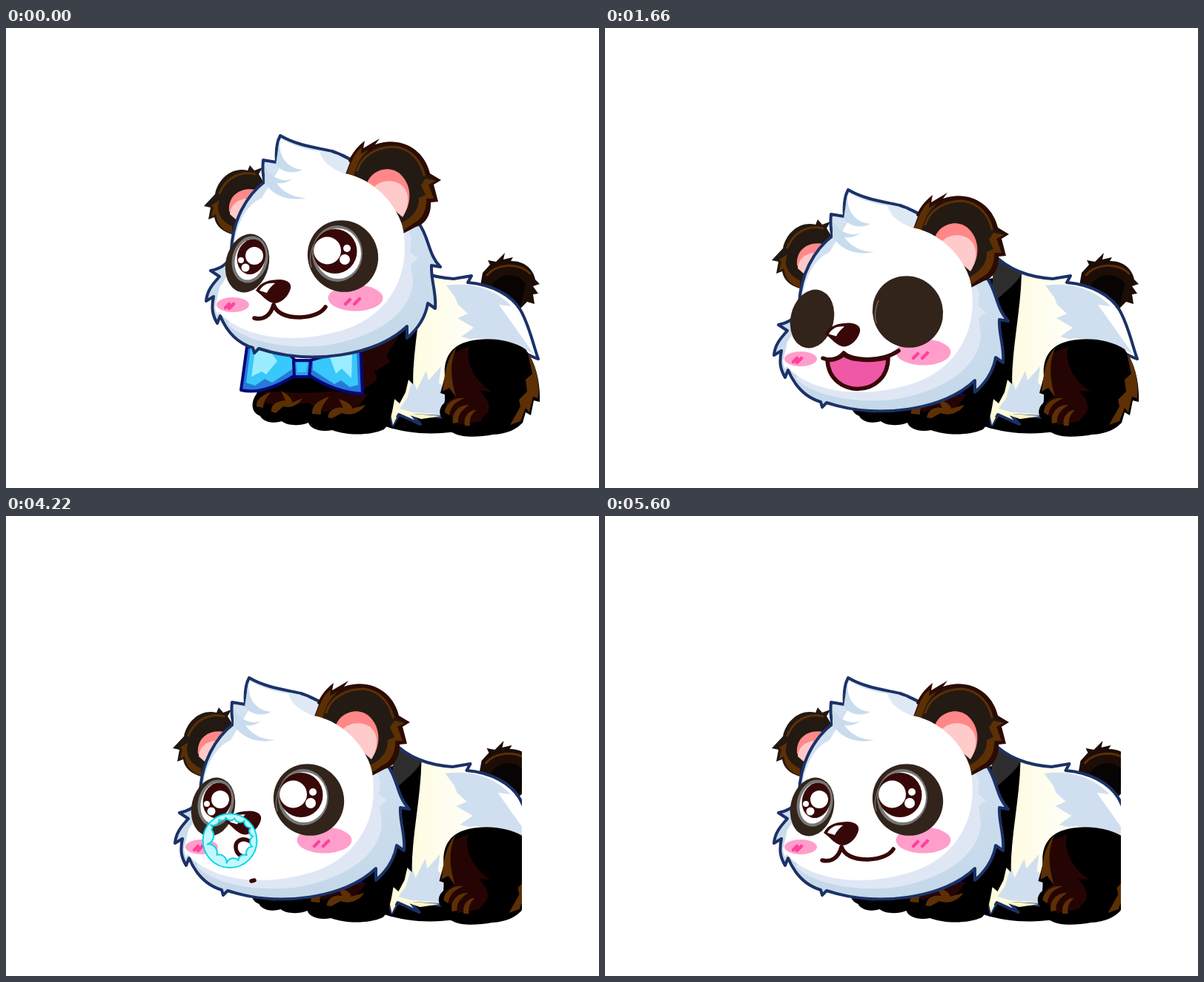
An HTML page that plays this animation: 800 by 620 pixels, repeating every 5820 ms.

```html
<!DOCTYPE html>
<html lang="en">
<head>
<meta charset="utf-8">
<title>Panda blowing a bubble</title>
<style>
html, body { margin: 0; width: 100%; height: 100%; overflow: hidden; background: #fff; }
svg { display: block; width: 100vw; height: 100vh; }
.ink { fill: none; stroke: #380707; stroke-width: 5.5; stroke-linecap: round; stroke-linejoin: round; }
.tongue { fill: #ef58a6; }
.fur { stroke: #1b3167; stroke-width: 4; stroke-linejoin: round; }
.brown { fill: #5d2f05; }
.rim { fill: none; stroke: #5d2f05; stroke-width: 3; stroke-linecap: round; }
.maroon { fill: #240504; }
.white { fill: #fff; }
.grey { fill: #777; }
.iris { fill: #380707; }
.patch { fill: #32241b; }
</style>
</head>
<body>
<svg viewBox="0 0 800 620">
  <defs>
    <linearGradient id="cream">
      <stop offset="0" stop-color="#fffbd9"/><stop offset=".7" stop-color="#fff"/>
    </linearGradient>
    <linearGradient id="shade" x1="0" y1="0" x2="0" y2="1">
      <stop offset="0" stop-color="#d6e4f3"/><stop offset="1" stop-color="#c4d8e9"/>
    </linearGradient>
    <clipPath id="stage"><rect id="stageRect" width="800" height="620"/></clipPath>
  </defs>

  <g clip-path="url(#stage)"><g id="body">
    <!-- tail -->
    <path fill="#1d0d07" d="M640 347L643 330L653 319L650 313L661 315L673 303L671 312L684 309L681 314C700 314 711 325 714 339L720 345L711 348L718 358L711 359L713 372L703 369L690 382L668 368Z"/>
    <path class="rim" d="M649 333C660 319 690 314 707 331"/>
    <path fill="#080404" d="M656 346C667 330 690 328 701 345L695 374L678 369L661 359Z"/>
    <!-- belly, back and light fur -->
    <path d="M508 520L534 518L600 528L606 544C580 548 545 548 512 537Z"/>
    <path class="fur" fill="url(#cream)" d="M524 305C545 327 575 336 604 338L628 334L623 343C656 346 682 360 694 380C706 401 710 423 718 446C700 440 690 430 660 420L594 500L590 524L548 522L559 534L530 521L522 535L517 512L543 450Z"/>
    <path fill="#d0dfef" d="M594 347C630 342 662 353 682 375L665 373L712 439C690 428 665 416 625 419L614 416L631 404L609 391L623 385L610 373L606 363Z"/>
    <path fill="#d0dfef" d="M549 472L554 488L567 462L570 475L587 456L584 478L594 488L588 521L548 518L531 513L541 499Z"/>
    <path fill="#fff6c8" d="M517 512L527 525L522 535ZM536 519L588 523L560 527Z"/>
    <!-- hind leg -->
    <path d="M592 494L586 492L592 470C590 445 600 428 625 422C650 416 682 420 701 433C716 453 721 480 720 504L712 502L708 522L701 518L697 532C688 541 677 547 657 548C636 552 615 552 604 546C592 541 588 536 590 528C582 520 585 510 592 505Z"/>
    <path class="maroon" d="M603 438L625 429C618 455 638 480 655 490L639 489C655 504 654 517 645 523L640 530L612 535L594 516L594 506L606 496L598 485Z"/>
    <path class="brown" d="M608 430C592 448 592 472 589 490L598 485L607 497C600 472 598 452 608 430ZM704 438C717 457 720 482 718 499L711 497L706 518L701 512L694 530L680 535L694 510L692 501L703 490L701 474L710 466Z"/>
    <path class="brown" d="M592 518C592 506 606 497 618 499C608 504 600 508 598 522ZM603 533C600 518 612 507 625 508C615 515 609 521 610 532ZM619 536C616 524 626 514 634 515C627 521 625 528 626 536Z"/>
    <!-- chest, front legs and neck -->
    <path d="M505 340L562 331C561 380 549 430 549 480L543 474L539 491L531 506L524 500C521 520 518 533 510 541C490 550 458 549 440 542C425 545 411 541 408 532C395 537 380 536 372 530C356 535 345 528 343 523C330 518 330 504 338 493L345 470L430 440Z"/>
    <path fill="#2d2d2e" d="M524 308C538 321 552 327 562 331C556 344 540 355 522 372Z"/>
    <path class="maroon" d="M480 432L530 415L513 442L519 450L497 463L501 474L478 490ZM350 490L404 492L440 490L488 494L470 517L445 511L430 518L407 505L380 508L345 506Z"/>
    <path class="brown" d="M338 510C337 500 347 494 357 491C350 500 347 505 347 512ZM358 517C357 506 367 503 377 502L371 489C381 494 386 500 386 505L400 499C394 509 383 513 374 510L364 519ZM413 520C412 508 423 501 436 497C428 507 424 513 425 521ZM434 525C436 513 446 510 455 512L449 500C462 504 467 509 467 513L485 508C477 520 463 523 453 519L440 526Z"/>
    <!-- bow tie -->
    <g stroke="#06087b" stroke-width="4" stroke-linejoin="round">
      <path fill="#2878d8" d="M325 430L317 488C342 494 368 482 390 468V448L370 425ZM411 448L478 425L481 493C455 492 432 483 409 468Z"/>
      <path fill="#2a9df0" d="M388 448H411L409 470H389Z"/>
    </g>
    <path fill="#38c8fb" d="M330 430L324 478L336 482L349 473L359 478L386 460V447L370 430ZM414 449L473 436L475 481L464 484L452 475L443 480L414 461Z"/>
    <path fill="#9becff" d="M336 435L331 470L345 463L351 467L366 449L355 434ZM437 444L467 438L466 472L453 459L445 466Z"/>
    <path fill="#38c8fb" d="M392 451H407L405 464H393Z"/>
  </g></g>

  <g id="head">
    <!-- left ear -->
    <path fill="#211912" d="M348 208L341 197L346 188L335 192L329 185L326 192C305 187 286 203 282 224L267 240L276 242L273 258L281 255C283 267 292 275 308 279L318 235Z"/>
    <path class="rim" d="M336 197C315 192 296 203 288 223"/>
    <path class="brown" d="M277 239L288 232C282 246 290 261 305 267V277C292 273 285 264 283 251L277 254L280 242Z"/>
    <path fill="#ff8989" d="M301 247C299 227 315 214 337 218L312 258Z"/>
    <path fill="#ffc9c9" d="M302 251C303 238 313 230 327 230L310 258Z"/>
    <!-- head outline -->
    <path class="fur" fill="url(#shade)" d="M370 145C392 158 417 161 440 166C468 176 520 205 556 262C571 281 569 305 586 322L574 320C573 340 581 357 579 378L569 371C566 390 556 405 541 418V402C500 442 410 455 341 432L335 438L333 431C313 425 299 412 289 388L285 398C278 386 277 377 280 362L270 368C271 354 279 345 288 335L276 327C292 324 304 315 304 298C306 260 323 227 349 207C346 198 346 188 347 178L365 181C364 168 365 154 370 145Z"/>
    <path fill="#dfe7f5" d="M547 284L545 302L556 310L546 318L549 340C548 378 510 415 430 428C380 433 325 424 300 400L320 260L430 180C500 190 535 250 547 284Z"/>
    <!-- right ear -->
    <path fill="#2b0b04" d="M455 200C460 180 468 164 484 152L482 162L504 149L498 157C529 146 563 160 572 196L587 205L577 211L583 234L573 235C574 252 565 265 553 268L534 278Z"/>
    <path fill="#231a13" d="M462 199C468 179 476 168 487 164L487 170L499 161C529 152 558 167 568 200L580 205L570 210L577 230L568 230C568 246 559 258 549 262L534 271L520 225Z"/>
    <path class="rim" d="M474 192C480 172 500 160 525 160C547 163 560 180 564 198"/>
    <path class="brown" d="M566 203L580 206L570 211L577 230L567 230C568 246 560 259 550 263L537 272L533 263C548 256 558 244 557 229L566 225L560 212ZM459 198C465 180 472 166 480 161L479 170L490 163C476 175 472 188 469 200Z"/>
    <path fill="#ff8787" d="M486 213C489 194 515 182 532 197C550 214 546 240 535 254Z"/>
    <path fill="#ffcaca" d="M493 219C500 206 520 202 533 211C546 222 544 240 535 255Z"/>
    <!-- face and forelock -->
    <path class="white" d="M306 304C310 265 322 240 345 229L374 181C369 170 368 158 371 149C392 163 420 166 438 169C430 174 438 181 457 196C502 204 536 249 537 281C544 345 507 397 440 411C376 427 315 414 287 383L285 387L282 377L288 350L301 330Z"/>
    <path fill="#dfe9f6" d="M423 165L448 171L464 181L458 197C441 190 426 182 423 165Z"/>
    <path fill="#c8dced" d="M369 151C368 171 377 189 400 191C386 198 372 194 364 184ZM349 186C355 199 372 210 386 203C380 209 371 210 365 209C374 222 387 228 405 229C380 234 361 226 349 209Z"/>
    <!-- cheeks -->
    <g fill="#ff9ecb"><ellipse cx="471.500" cy="364" rx="37" ry="17.500"/><ellipse cx="306" cy="373" rx="22" ry="10"/></g>
    <path stroke="#ff429c" stroke-width="4.500" stroke-linecap="round" d="M458 372L464 366M470 372L477 365M296 377L301 372M301 378L307 372"/>

    <g id="eyes">
      <g class="patch">
        <ellipse cx="325.500" cy="317" rx="29" ry="40" transform="rotate(14 325.500 317)"/>
        <ellipse cx="454.500" cy="307.500" rx="47" ry="49" transform="rotate(-35 454.500 307.500)"/>
      </g>
      <path fill="none" stroke="#75665c" stroke-width="1.500" d="M415 292C410 304 409 314 412 323"/>
      <g id="open">
        <g transform="rotate(14 329 312)">
          <ellipse class="grey" cx="329" cy="312" rx="24" ry="32"/>
          <ellipse class="white" cx="329" cy="312" rx="20" ry="28"/>
          <ellipse class="iris" cx="330" cy="308" rx="19" ry="24"/>
        </g>
        <ellipse class="grey" cx="447" cy="304" rx="34" ry="38"/>
        <ellipse class="white" cx="448" cy="304" rx="31" ry="34"/>
        <ellipse class="iris" cx="444" cy="301" rx="29.500" ry="30"/>
        <g class="white">
          <circle cx="335" cy="307" r="12"/><circle cx="317" cy="313" r="4"/><circle cx="323" cy="323" r="5.500"/>
          <circle cx="433.500" cy="300" r="18.500"/><circle cx="460" cy="297" r="5"/><circle cx="457" cy="312" r="7"/>
        </g>
      </g>
      <g id="half">
        <path class="grey" d="M417 326L482 303C484 322 470 342 448 342C434 341 423 336 417 326ZM301 312L352 327C346 343 336 347 326 346C312 344 303 332 301 312Z"/>
        <path class="white" d="M422 327L478 308C477 325 464 338 449 338C437 338 428 334 422 327ZM304 314L349 327C344 340 334 344 326 343C314 341 306 330 304 314Z"/>
        <path class="iris" d="M418 326L479 304L468 313C467 324 456 331 444 331C436 331 430 329 426 325ZM304 312L351 326L345 328C340 334 330 336 322 333C314 329 310 323 309 316Z"/>
        <circle class="white" cx="324" cy="323" r="5"/><circle class="white" cx="315" cy="319" r="2.500"/>
      </g>
    </g>

    <path id="bowl" class="ink tongue"/>
    <path id="lips" class="ink"/>
    <g id="nose">
      <path class="iris" d="M337 354C343 342 356 339 370 339C381 340 387 345 383 354C379 364 370 371 362 371C352 370 346 360 337 354Z"/>
      <path class="white" d="M342 354C346 346 354 343 363 344C358 348 354 352 352 357Z"/>
    </g>
  </g>

  <path id="bubble" fill="#c2f8fc" fill-rule="evenodd" stroke="#08d5ea" stroke-width="5" stroke-linejoin="round"/>
  <path id="spray" fill="none" stroke="#08d5ea" stroke-width="5" stroke-linecap="round"/>
</svg>
<script>
const LOOP = 5820;
const el = id => document.getElementById(id);

// Each track lists [start time, value]; values hold until the next entry.
const HEAD = [[0, [0, 0]], [580, [0, -14]], [720, [6, -21]], [860, [24, -27]],
  [1000, [-27, 20]], [1100, [-36, 48]], [1200, [-42, 73]]];
const EYES = [[0, 'open'], [1000, 'half'], [1100, 'closed'], [3020, 'half'], [3160, 'open']];
const MOUTH = [[0, 'smile'], [1460, 'half'], [1560, 'wide'], [1760, 'half'], [1960, 'smile'],
  [3600, 'half'], [3700, 'wide'], [3800, 'half'], [4020, 'pucker'], [5400, 'half'], [5600, 'smile']];
const BUBBLE = [[0, 0], [4120, .2], [4220, .4], [4320, .6], [4420, .8], [4520, .98],
  [4740, 1], [4880, 1.16], [5020, 0]];
const SPRAY = [[0, false], [5020, true], [5120, false]];

const MOUTHS = {
  smile: ['M335 391C347 394 357 388 361 373C366 387 382 390 397 390C413 389 425 385 431 376', ''],
  half: ['M341 378C348 386 360 384 364 374C372 390 420 388 433 370', 'M350 385C362 415 410 417 419 384C400 388 372 389 364 376Q359 385 350 385Z'],
  wide: ['M336 372C346 376 356 374 364 365C375 376 415 378 438 362', 'M342 374C344 427 424 427 424 371C404 376 374 376 364 367Q354 375 342 374Z'],
  pucker: ['M370 365C362 360 351 364 352 374C353 385 363 388 369 385M373 419L377 418', '']
};

function at(track, t) {
  let value;
  for (const [start, v] of track) if (t >= start) value = v;
  return value;
}

// Scalloped hole inside a circular rim, centred on the origin.
const CUSPS = [[-36, -71], [-14, -78], [16, -75], [49, -67], [70, -44], [78, -14],
  [76, 20], [57, 49], [29, 66], [-11, 75], [-44, 48], [-76, 12], [-62, -37], [-65, -53]];
const hole = CUSPS.map(([x, y], i) => {
  const [px, py] = CUSPS.at(i - 1);
  const r = Math.hypot(x - px, y - py) * .6;
  return `A${r} ${r} 0 0 0 ${x} ${y}`;
}).join('');
el('bubble').setAttribute('d',
  `M-91 0A91 91 0 1 1 91 0A91 91 0 1 1 -91 0ZM${CUSPS.at(-1)}${hole}Z`);

el('spray').setAttribute('d', Array.from({ length: 14 }, (_, i) => {
  const a = i * Math.PI / 7;
  const point = r => `${277 + r * Math.cos(a)} ${420 + r * Math.sin(a)}`;
  return `M${point(100)}L${point(i % 2 ? 107 : 113)}`;
}).join(''));

const move = (id, x, y) => el(id).setAttribute('transform', `translate(${x} ${y})`);
const show = (id, on) => el(id).setAttribute('visibility', on ? 'visible' : 'hidden');

function draw(t) {
  const [x, y] = at(HEAD, t);
  const settled = t >= 2100;
  move('head', x, y);
  move('body', settled ? -1.5 : 0, 0);
  el('stageRect').setAttribute('width', settled ? 696 : 800);

  const eyes = at(EYES, t);
  const lying = t >= 1200;
  move('eyes', lying ? -4 : 0, lying ? 2 : 0);
  for (const state of ['open', 'half']) show(state, eyes === state);

  const mouth = at(MOUTH, t);
  const [lips, bowl] = MOUTHS[mouth];
  el('lips').setAttribute('d', lips);
  el('bowl').setAttribute('d', bowl);
  move('nose', mouth === 'smile' ? 0 : 2, mouth === 'smile' ? 0 : -14.5);

  const size = at(BUBBLE, t);
  const grown = Math.min(size, 1);
  show('bubble', size > 0);
  el('bubble').setAttribute('transform',
    `translate(${322 - 50 * grown} ${450 - 31 * grown}) scale(${size})`);
  show('spray', at(SPRAY, t));
}

function tick() {
  draw(performance.now() % LOOP);
  requestAnimationFrame(tick);
}
tick();
</script>
</body>
</html>
```
